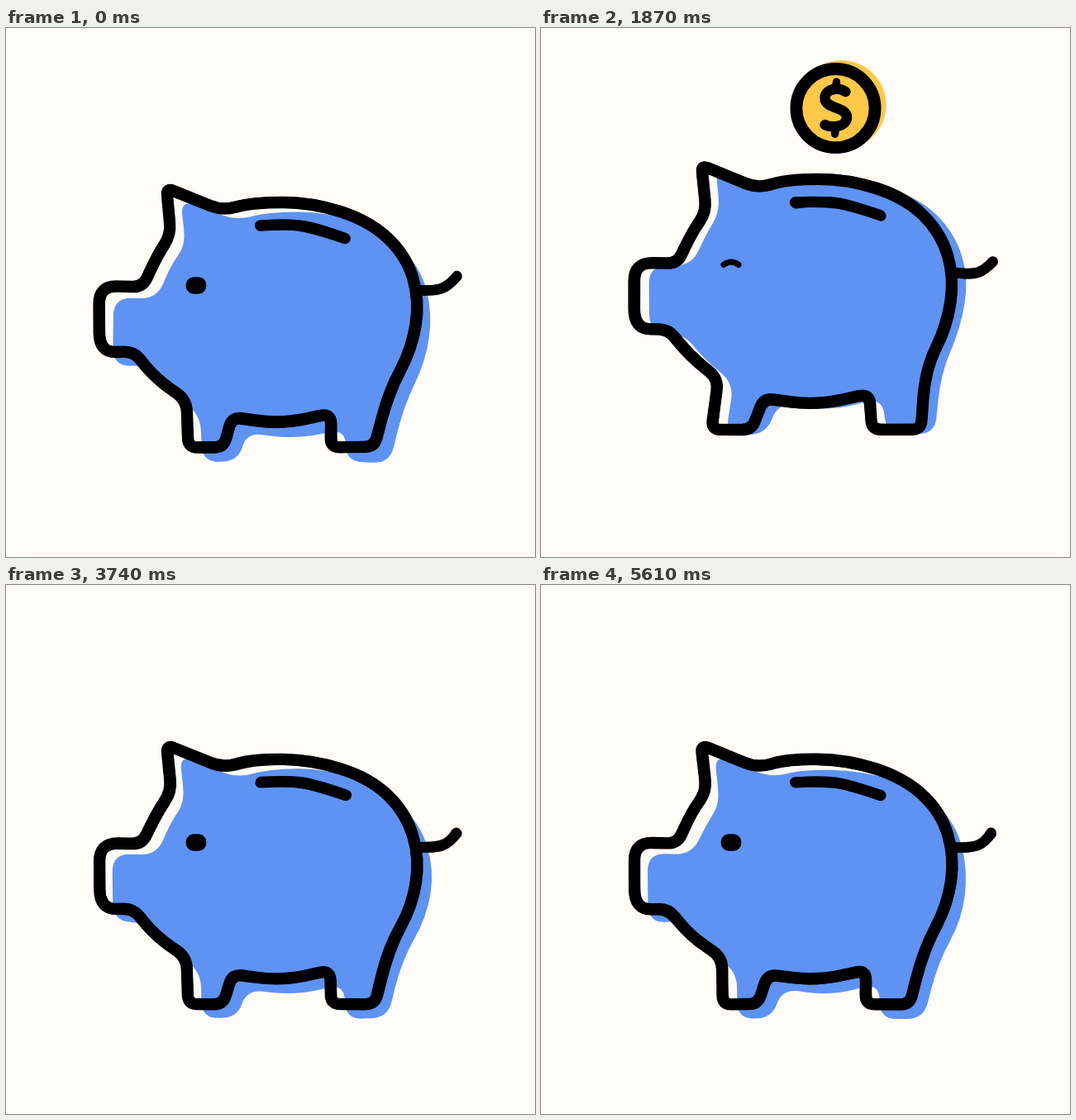
Recreate the animation shown at these times as an HTML page with a canvas. Size 640 px wide and 640 px high, loop 5.78 s.

```html
<!DOCTYPE html>
<html>
<head>
<meta charset="utf-8">
<title>Piggy bank</title>
<style>
html, body { margin: 0; width: 100%; height: 100%; overflow: hidden; background: #fffcf7; }
canvas { display: block; }
</style>
</head>
<body>
<canvas id="stage" width="640" height="640"></canvas>
<script>
const g = document.getElementById('stage').getContext('2d');
const BLUE = '#5e93f4', GOLD = '#ffc847', PAPER = '#fffcf7', INK = '#000';
const STEP = 170, STEPS = 34, LIFT = 51;

// Corners of the standing pig, clockwise from the ear: x, y and how far
// before the corner the bend starts (none: bend across the whole side).
const body = [
  [194, 194, 9], [262, 221, 16], [300, 211], [370, 211], [440, 233], [484, 275],
  [500, 330], [491, 388], [463, 440], [446, 507, 11], [393, 507, 11], [393, 466, 13],
  [333, 479], [274, 471, 12], [263, 507, 11], [220, 507, 11], [219, 450, 14],
  [180, 424], [154, 392, 12], [113, 392, 24], [113, 312, 22], [165, 313, 12],
  [183, 274], [200, 250, 14]
];
const slot = [[308, 239], [340, 237], [375, 242], [411, 254]];
const tail = [[0, 0], [21, 1], [38, -6], [46, -17]];
const eye = [230, 311.5];

// Step and pose: -1 is crouching, 0 standing, 1 the top of the jump.
const keys = [[0, 0], [3, -1], [7.5, 1.04], [14.7, 0]];

function poseAt(k) {
  const i = keys.findIndex(([time]) => time > k);
  if (i < 1) return 0;
  const [[t0, p0], [t1, p1]] = [keys[i - 1], keys[i]];
  return p0 + (p1 - p0) * (1 - Math.cos(Math.PI * (k - t0) / (t1 - t0))) / 2;
}

// Crouching presses the body down over its feet; jumping lifts it and spreads the legs.
function pose([x, y, cut], p) {
  if (p < 0) {
    const sag = 11 + 8 * Math.exp(-(((x - 370) / 110) ** 2));
    return [x, y - p * sag * (1 - Math.exp((y - 525) / 70)), cut];
  }
  const t = Math.max(0, Math.min(1, (y - 420) / 80)), leg = t * t * (3 - 2 * t);
  return [x + p * leg * (x - 335) * .22, y - p * (LIFT - 12 * leg), cut];
}

function random(seed) {
  let s = seed * 7919 + 17;
  return () => {
    s = Math.imul(s ^ s >>> 15, s | 1) + 0x6D2B79F5 | 0;
    return ((s ^ s >>> 13) >>> 0) / 4294967296;
  };
}

function wobble(pts, amount, rnd) {
  const shift = () => (rnd() - .5) * 2 * amount;
  return pts.map(([x, y, cut]) => [x + shift(), y + shift(), cut]);
}

// Closed outline with a soft bend at each corner.
function outline(pts, minCut = 0) {
  const n = pts.length;
  const toward = (a, b, cut = Infinity) => {
    const dx = b[0] - a[0], dy = b[1] - a[1];
    const f = Math.min(.5, Math.max(cut, minCut) / Math.hypot(dx, dy));
    return [a[0] + dx * f, a[1] + dy * f];
  };
  g.beginPath();
  pts.forEach((p, i) => {
    g.lineTo(...toward(p, pts[(i + n - 1) % n], p[2]));
    g.quadraticCurveTo(p[0], p[1], ...toward(p, pts[(i + 1) % n], p[2]));
  });
  g.closePath();
}

function stroke4([a, b, c, d]) {
  g.beginPath();
  g.moveTo(a[0], a[1]);
  g.quadraticCurveTo(b[0], b[1], (b[0] + c[0]) / 2, (b[1] + c[1]) / 2);
  g.quadraticCurveTo(c[0], c[1], d[0], d[1]);
}

function ink(width) {
  g.strokeStyle = INK;
  g.lineWidth = width;
  g.stroke();
}

// Two slightly different passes give an uneven pen line.
function penLine(path, pts, width, rnd) {
  for (const pass of [0, 1]) {
    path(wobble(pts, .7 + pass * .5, rnd));
    ink(width - pass);
  }
}

function disc(x, y, r) {
  g.beginPath();
  g.arc(x, y, r, 0, 7);
}

function drawCoin(k, slotPts) {
  g.save();
  // Only the part above the slot shows.
  g.beginPath();
  g.moveTo(0, 0);
  g.lineTo(0, slotPts[0][1]);
  slotPts.forEach(([x, y]) => g.lineTo(x, y));
  g.lineTo(640, slotPts[3][1]);
  g.lineTo(640, 0);
  g.clip();

  g.translate(356.5, 64.6 + 9.3 * (k - 9.13) ** 2);
  g.fillStyle = GOLD;
  disc(7, Math.max(-4, Math.min(6, (9.5 - k) * 2.6)), 54);
  g.fill();
  disc(0, 0, 47.6);
  ink(14.8);
  g.beginPath();
  g.moveTo(12, -20);
  g.bezierCurveTo(3, -26, -13, -24, -13, -12);
  g.bezierCurveTo(-13, 1, 14, -2, 13.5, 11);
  g.bezierCurveTo(13, 23, -5, 24, -13, 20);
  ink(12.5);
  g.beginPath();
  g.moveTo(1, -32);
  g.lineTo(0, -24);
  g.moveTo(0, 24);
  g.lineTo(-1, 31);
  ink(9.5);
  g.restore();
}

function drawEye(closed, [x, y]) {
  g.beginPath();
  if (closed) {
    g.moveTo(x - 9, y + 2.5);
    g.quadraticCurveTo(x, y - 4, x + 9, y + 2.5);
    ink(7.2);
  } else {
    g.fillStyle = INK;
    g.roundRect(x - 12.3, y - 10.3, 24.6, 20.6, 9.5);
    g.fill();
  }
}

function drawTail(p, rnd) {
  g.save();
  g.translate(499, 317 - 40 * Math.max(p, 0));
  g.rotate(.19 * p);
  penLine(stroke4, tail, 12.6, rnd);
  g.restore();
}

function draw(k) {
  const rnd = random(k + 1), p = poseAt(k);
  const bodyPts = body.map(pt => pose(pt, p)), slotPts = slot.map(pt => pose(pt, p));

  g.fillStyle = PAPER;
  g.fillRect(0, 0, 640, 640);
  g.lineCap = g.lineJoin = 'round';

  // The colour lies a little off the line and trails behind it in the jump.
  const fall = p > 0 ? (poseAt(k - 1) - p) * LIFT : 0;
  const dx = 17 - 4 * Math.min(p, 0) + rnd() - .5;
  const dy = 15 - Math.max(-3, Math.min(11, fall)) + rnd() - .5;
  const shade = bodyPts.map(([x, y, cut]) => [x + dx, y + dy + (y - 350) * .02, cut]);
  outline(wobble(shade, 1.5, rnd), 20);
  g.fillStyle = BLUE;
  g.fill();

  penLine(outline, bodyPts, 14.3, rnd);
  drawTail(p, rnd);
  drawEye(k >= 2 && k <= 13, pose(eye, p));
  if (k >= 6 && k <= 13) drawCoin(k, slotPts);
  penLine(stroke4, slotPts, 13.2, rnd);
}

function tick() {
  draw(Math.floor(performance.now() / STEP) % STEPS);
  requestAnimationFrame(tick);
}
tick();
</script>
</body>
</html>
```
